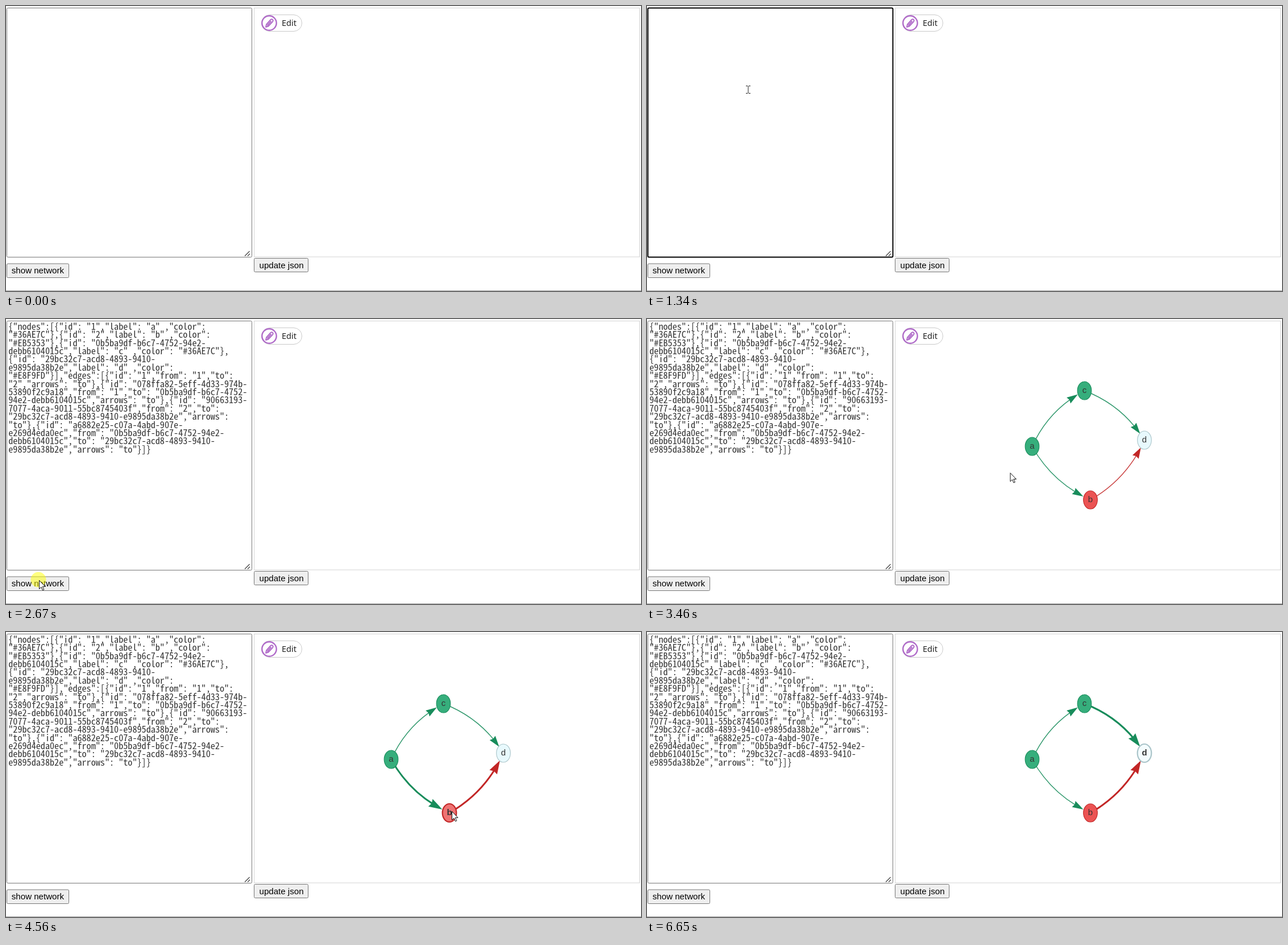
These frames come from a looping animation (1117 px wide and 501 px high, 7.17 s). An HTML page:

```html
<!DOCTYPE html>
<html lang="en">
<head>
<meta charset="utf-8">
<title>Network editor</title>
<style>
html, body { margin: 0; width: 100%; height: 100%; overflow: hidden; background: #fff }
svg { display: block }
text { font-family: "Liberation Sans", Arial, sans-serif }
.button rect { fill: #efefef; stroke: #767676 }
.button text { font-size: 15.1px; fill: #000 }
.label { font-size: 15px; fill: #343434; text-anchor: middle }
</style>
</head>
<body>
<svg width="1117" height="501" viewBox="0 0 1117 501">
  <rect id="area" x="1.5" y="3.5" width="431" height="438" rx="2" fill="#fff"/>
  <path d="M420 439.5l8.5-8.5M425 439.5l4-4" stroke="#444" stroke-width="1.2"/>
  <g id="json" fill="#333"></g>
  <path id="caret" stroke="#000"/>
  <rect x="436.5" y="3.5" width="678" height="437.5" fill="none" stroke="#d3d3d3"/>
  <rect x="449.5" y="15.5" width="71" height="29" rx="14.5" fill="#fff" stroke="#c9c9c9"/>
  <g fill="none" stroke="#b06bc9" stroke-linejoin="round">
    <circle cx="463" cy="30" r="12.7" stroke-width="2.4"/>
    <path d="M457 37l1-4.5 7.5-8.5q2-1.5 3.5 0t0 3.500l-7.500 8zM459.5 34.5l7-8" stroke-width="1.9"/>
  </g>
  <text x="485" y="35.3" style="font:14.6px 'Noto Sans','Open Sans',sans-serif" fill="#222">Edit</text>
  <g class="button">
    <rect x="1.5" y="453" width="109" height="24.5" rx="2"/>
    <text x="9.8" y="469.5">show network</text>
  </g>
  <g class="button">
    <rect x="436.5" y="443.5" width="95" height="24" rx="2"/>
    <text x="445.5" y="460.5">update json</text>
  </g>
  <path d="M0 500.5H1117" stroke="#a0a0a0"/>
  <g id="net"></g>
  <g id="pointer">
    <circle id="press" r="13.5" fill="#ff0" opacity=".5"/>
    <path id="arrow" d="M1.500.5V15.500l3.500-3.300 2.500 5.600 2.300-1-2.500-5.400h4.700z" fill="#fff" stroke="#111"/>
    <path id="beam" d="M-4-6.500h3l1 1 1-1h3M0-5.500v11M-4 6.500h3l1-1 1 1h3" fill="none" stroke="#222"/>
  </g>
</svg>
<script>
const LOOP = 7170;
const $ = id => document.getElementById(id);
const set = (el, attrs) => { for (const k in attrs) el.setAttribute(k, attrs[k]); };
const show = (el, on) => { el.style.display = on ? '' : 'none'; };
const add = (parent, tag, attrs, text = '') => {
  const el = document.createElementNS('http://www.w3.org/2000/svg', tag);
  set(el, attrs);
  el.textContent = text;
  return parent.appendChild(el);
};

const json = `{"nodes":[{"id": "1","label": "a" ,"color":
"#36AE7C"},{"id": "2","label": "b" ,"color":
"#EB5353"},{"id": "0b5ba9df-b6c7-4752-94e2-
debb6104015c","label": "c" ,"color": "#36AE7C"},
{"id": "29bc32c7-acd8-4893-9410-
e9895da38b2e","label": "d" ,"color":
"#E8F9FD"}],"edges":[{"id": "1","from": "1","to":
"2","arrows": "to"},{"id": "078ffa82-5eff-4d33-974b-
53890f2c9a18","from": "1","to": "0b5ba9df-b6c7-4752-
94e2-debb6104015c","arrows": "to"},{"id": "90663193-
7077-4aca-9011-55bc8745403f","from": "2","to":
"29bc32c7-acd8-4893-9410-e9895da38b2e","arrows":
"to"},{"id": "a6882e25-c07a-4abd-907e-
e269d4eda0ec","from": "0b5ba9df-b6c7-4752-94e2-
debb6104015c","to": "29bc32c7-acd8-4893-9410-
e9895da38b2e","arrows": "to"}]}`;

// Pick the font size that gives a character advance of 8.08px
const mono = '"Noto Sans Mono CJK JP", "Liberation Mono", monospace';
const ctx = document.createElement('canvas').getContext('2d');
ctx.font = '100px ' + mono;
const size = 808 / ctx.measureText('0').width;
json.split('\n').forEach((line, i) => {
  add($('json'), 'text', { x: 4.3, y: 18.7 + 14.4 * i }, line).style.font = `${size}px ${mono}`;
});

const node = (x, y, fill, lit, line) => ({ x, y, fill, lit, line });
const nodes = {
  a: node(677.5, 224, '#36ae7c', '#5cc096', '#188c5b'),
  b: node(780, 318, '#eb5353', '#ee7373', '#c22626'),
  c: node(769.5, 126, '#36ae7c', '#5cc096', '#188c5b'),
  d: node(875, 213, '#e8f9fd', '#f4fcfe', '#a9c4c9')
};
// side: which way the edge bows out from its chord
const edges = [
  { from: 'a', to: 'c', side: 1 },
  { from: 'a', to: 'b', side: -1 },
  { from: 'c', to: 'd', side: 1 },
  { from: 'b', to: 'd', side: -1 }
];

const BULGE = 23, TIP = .905, HEAD = .85;
const bend = (a, c, b, u) => (1 - u) ** 2 * a + 2 * u * (1 - u) * c + u * u * b;
const slope = (a, c, b, u) => (1 - u) * (c - a) + u * (b - c);
for (const e of edges) {
  const p = nodes[e.from], q = nodes[e.to];
  const dx = q.x - p.x, dy = q.y - p.y, k = e.side * BULGE / Math.hypot(dx, dy);
  const cx = (p.x + q.x) / 2 + dy * k, cy = (p.y + q.y) / 2 - dx * k;
  const xs = [p.x, cx, q.x], ys = [p.y, cy, q.y];
  const angle = Math.atan2(slope(...ys, HEAD), slope(...xs, HEAD)) * 180 / Math.PI;
  e.curve = add($('net'), 'path', {
    d: `M${p.x} ${p.y}Q${cx} ${cy} ${q.x} ${q.y}`,
    fill: 'none', stroke: p.line, pathLength: 100, 'stroke-dasharray': '79 100'
  });
  e.head = add($('net'), 'path', {
    fill: p.line,
    transform: `translate(${bend(...xs, TIP)} ${bend(...ys, TIP)}) rotate(${angle})`
  });
}
for (const key in nodes) {
  const n = nodes[key];
  n.shape = add($('net'), 'ellipse', { cx: n.x, cy: n.y, rx: 12.3, ry: 16, stroke: n.line });
  n.label = add($('net'), 'text', { class: 'label', x: n.x, y: n.y + 4.3 }, key);
}

// Pointer path: time, x, y
const path = [
  [190, 1008, 488], [400, 430, 240], [560, 215, 155], [690, 178, 147],
  [1600, 178, 147], [1870, 92, 321], [2150, 62, 435], [2470, 57, 459],
  [3020, 57, 459], [3220, 300, 385], [3460, 637, 270], [3600, 715, 288], [3770, 757, 304],
  [4400, 783, 315], [4720, 783, 315], [5050, 850, 245], [5280, 889, 213], [5440, 884, 216],
  [6190, 884, 216], [6420, 960, 345], [6650, 1052, 501]
];
const presses = [[720, 850], [2670, 2730], [4420, 4560], [5700, 5830]];
const within = (t, [from, to]) => t >= from && t < to;

function pointerAt(t) {
  const i = path.findIndex(p => p[0] > t);
  if (i < 1) return null;
  const [t0, x0, y0] = path[i - 1], [t1, x1, y1] = path[i];
  const u = (t - t0) / (t1 - t0);
  return { x: x0 + (x1 - x0) * u, y: y0 + (y1 - y0) * u };
}

function draw(t) {
  const p = pointerAt(t);
  const inArea = !!p && p.x < 433 && p.y > 3 && p.y < 442;
  show($('pointer'), p);
  if (p) set($('pointer'), { transform: `translate(${p.x} ${p.y})` });
  show($('beam'), inArea);
  show($('arrow'), !inArea);
  show($('press'), presses.some(r => within(t, r)));
  set($('press'), { cx: inArea ? -2 : 0, cy: -.7 });

  const focus = within(t, [790, 2670]);
  set($('area'), { stroke: focus ? '#000' : inArea ? '#333' : '#767676', 'stroke-width': focus ? 2 : 1 });
  show($('json'), t >= 1400);
  show($('caret'), within(t, [790, 1340]) || within(t, [1870, 2410]));
  set($('caret'), { d: `M4.5 ${t < 1400 ? 7 : 237}v14` });

  show($('net'), t >= 2730);
  const picked = t >= 5830 ? 'd' : t >= 4560 ? 'b' : '';
  const active = new Set([picked]);
  for (const key in nodes) {
    const n = nodes[key], chosen = key === picked;
    if (p && Math.hypot((p.x - n.x) / 12.5, (p.y - n.y) / 16) < 1) active.add(key);
    set(n.shape, { fill: active.has(key) ? n.lit : n.fill, 'stroke-width': chosen ? 2.2 : 1.1 });
    set(n.label, { 'font-weight': chosen ? 700 : 400 });
  }
  for (const e of edges) {
    const bold = active.has(e.from) || active.has(e.to);
    const len = bold ? 24 : 19.5;
    set(e.curve, { 'stroke-width': bold ? 3 : 1.4, 'stroke-opacity': bold ? 1 : .9 });
    set(e.head, { d: `M0 0L${-len} ${len * .32}L${-len * .9} 0L${-len} ${-len * .32}z` });
  }
}

const start = performance.now();
function tick(now) {
  draw(Math.max(0, now - start) % LOOP);
  requestAnimationFrame(tick);
}
draw(0);
requestAnimationFrame(tick);
</script>
</body>
</html>
```
